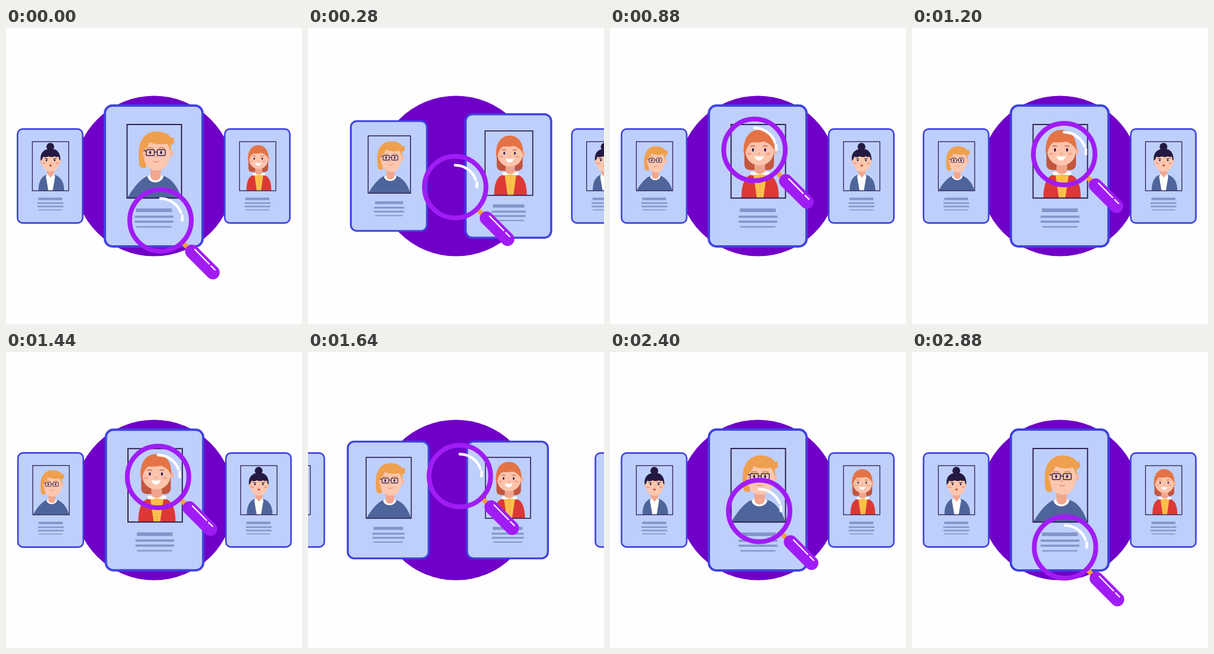
An HTML page for the animation above (2.92 s loop, 500x500 px).

```html
<!DOCTYPE html>
<html lang="en">
<head>
<meta charset="utf-8">
<title>Candidate search</title>
<style>
  html, body { margin: 0; width: 100%; height: 100%; overflow: hidden; background: #fefefe; }
  svg { display: block; width: 100vw; height: 100vh; }
</style>
</head>
<body>
<svg viewBox="0 0 500 500" xmlns="http://www.w3.org/2000/svg">
  <defs>
    <!-- artwork is drawn at full size around (249.5, 250) -->
    <g id="card">
      <rect x="167" y="131" width="165" height="238" rx="13" fill="#becffb" stroke="#4042e0" stroke-width="4"/>
      <g fill="#8495c9">
        <rect x="219.5" y="304.8" width="60.5" height="6.2"/>
        <rect x="217.3" y="316.8" width="65.4" height="3.8"/>
        <rect x="217.3" y="325.4" width="65.4" height="3.6"/>
        <rect x="220" y="334.7" width="59.4" height="2.4"/>
      </g>
    </g>
    <rect id="frame" x="204.5" y="163" width="92" height="124.3" fill="none" stroke="#2a1b4c" stroke-width="1.9"/>

    <g id="man">
      <path d="M205 287C215 270 228 253 242 249H263C278 252 290 267 296 287Z" fill="#4e659b"/>
      <path d="M239 250.5C241 264 263 264 266 250.500L261 248H244Z" fill="#fff"/>
      <path d="M244 234H261.500V250C260 260 245 260 244 250Z" fill="#f2a78f"/>
      <path d="M226 234C223 216 224 202 227 194C233 178 247 172 264 176Q274 178 279 186L283 184L284 194Q281 197 278 198L279 208L272 214L238 214L236 236Q230 238 226 234Z" fill="#efa04e"/>
      <ellipse cx="278.500" cy="212" rx="4" ry="5" fill="#f8b99f"/>
      <path d="M235 204Q241 200 242 193Q258 199 271 195Q276 199 277 208C278 226 270 241 255 241C240 241 233 228 233 216Z" fill="#fcc7ae"/>
      <ellipse cx="234" cy="213" rx="3.500" ry="5" fill="#f8b99f"/>
      <g fill="none" stroke="#d98f52" stroke-width="1.700"><path d="M238 203.500Q243 201 249 203M257 203Q263 201 268 203.500"/></g>
      <g fill="#2b1d55"><ellipse cx="243.500" cy="210.300" rx="1.700" ry="2.900"/><ellipse cx="262" cy="210.300" rx="1.700" ry="2.900"/></g>
      <g fill="none" stroke="#2b1d55" stroke-width="1.400">
        <rect x="237" y="205.500" width="13.500" height="10" rx="1.500"/>
        <rect x="255.500" y="205.500" width="13.500" height="10" rx="1.500"/>
        <path d="M250.500 209.500H255.500M237 208L233 207"/>
      </g>
      <path d="M251 217.500Q253 219 255 217.500M248 224.500Q253 228 259 224.500" fill="none" stroke="#e08f78" stroke-width="1.300"/>
    </g>

    <g id="red">
      <path d="M227 198H277V231Q276 240 266 240H238Q227 240 227 230Z" fill="#c3563f"/>
      <path d="M222 287C222 268 226 252 238 248H268C281 252 285 268 285 287Z" fill="#dc3936"/>
      <path d="M242 246H265L259 287H248Z" fill="#fcc04c"/>
      <path d="M253.500 250V286" stroke="#d88b33" stroke-width="1.200" stroke-dasharray="1.500 4"/>
      <path d="M237 243.500L245 242H262L270 243.500L268 249L254 247L239 249Z" fill="#fff"/>
      <path d="M244 228H262V243Q253 250 244 243Z" fill="#f1a58d"/>
      <ellipse cx="279" cy="208" rx="3" ry="4.500" fill="#f8b39a"/>
      <path d="M228 204C228 190 238 183 253 183C268 183 277 192 277 206C277 222 266 232 253 232C239 232 228 222 228 204Z" fill="#fcc4ac"/>
      <path d="M226 212C224 187 235 172 252 172C269 172 279 186 278 208Q273 196 261 192Q246 194 239 193Q231 199 229 211Z" fill="#e47446"/>
      <g fill="#f6a58e"><ellipse cx="235" cy="212.500" rx="4" ry="2"/><ellipse cx="267" cy="212.500" rx="4" ry="2"/></g>
      <g fill="#2b1d55"><ellipse cx="241.500" cy="206" rx="1.700" ry="2.900"/><ellipse cx="262" cy="206" rx="1.700" ry="2.900"/></g>
      <path d="M237 200Q241 198 245 200M258 200Q262 198 266 200" fill="none" stroke="#c3563f" stroke-width="1.300"/>
      <path d="M250 211.500Q252 213 254 211.500" fill="none" stroke="#e58f78" stroke-width="1.300"/>
      <path d="M244 216.500Q252 218 260 216.500Q257 224 252 224Q246 224 244 216.500Z" fill="#fff"/>
    </g>

    <g id="dark">
      <path d="M220 287C220 267 226 252 240 247H261C278 252 285 267 285 287Z" fill="#4e659b"/>
      <path d="M241 246H260L262 252L256 287H245L239 252Z" fill="#fff"/>
      <path d="M241.500 232H259.500V244L251 254L241.500 244Z" fill="#f2a78f"/>
      <circle cx="250" cy="176" r="9.800" fill="#241943"/>
      <path d="M226 213C222 190 236 181 251 181C268 181 277 192 275 213Z" fill="#241943"/>
      <g fill="#f8b99f"><ellipse cx="228.500" cy="214" rx="3" ry="5"/><ellipse cx="273" cy="214" rx="3" ry="5"/></g>
      <path d="M229 208L232 201Q239 204 245 200Q255 204 261 200Q266 203 271 201L273 210C274 228 264 239 251 239C237 239 228 228 229 208Z" fill="#fcc7ae"/>
      <g fill="#f59c8a"><ellipse cx="234" cy="217.500" rx="4" ry="2.500"/><ellipse cx="267" cy="217.500" rx="4" ry="2.500"/></g>
      <g fill="#241943"><ellipse cx="240.500" cy="210" rx="1.800" ry="2.900"/><ellipse cx="261" cy="210" rx="1.800" ry="2.900"/></g>
      <path d="M235.500 205.500L244 206.500M257 206.500L266 205.500" stroke="#241943" stroke-width="1.400"/>
      <path d="M249 216.500Q251 218 253 216.500" fill="none" stroke="#e58f78" stroke-width="1.200"/>
      <ellipse cx="250.500" cy="223.500" rx="3.200" ry="2.200" fill="#c2433f"/>
    </g>
  </defs>

  <circle cx="250" cy="250" r="135.500" fill="#7000c8"/>
  <g id="cards"></g>

  <g id="lens" fill="none" stroke-linecap="round">
    <path d="M37 37L47 47" stroke="#f2a23c" stroke-width="8" stroke-linecap="butt"/>
    <path d="M53 52.500L88.500 88" stroke="#a01cf5" stroke-width="23"/>
    <circle r="52" stroke="#a01cf5" stroke-width="8"/>
    <g stroke="#fff">
      <path d="M0 -37A37 37 0 0 1 34.500 -13" stroke-width="4.600"/>
      <path d="M36.700 -8V0" stroke-width="4.600"/>
      <path d="M58 49L82 73.500M85.500 77L92 83.500" stroke-width="2.300"/>
    </g>
  </g>
</svg>
<script>
  const LOOP = 2920, STEP = 40, SWAP = 600, BACK = 1420;
  const MID = 249.5, SIDE = 0.667;

  // Offsets from the middle and scales for a move to the right: [ms, x, scale]
  const MOVES = {
    coming: [[0, -175, SIDE], [220, -114, 0.828], [500, -2, 1.014], [600, 0, 1]],
    going: [[0, 0, 1], [220, 87.5, 0.828], [500, 185.5, 0.64], [600, 175, SIDE]],
    leaving: [[0, 175, SIDE], [220, 291, SIDE], [500, 400, SIDE], [600, 400, SIDE]],
    entering: [[0, -340, SIDE], [220, -277, SIDE], [500, -163.5, SIDE], [600, -175, SIDE]]
  };

  // Centre of the glass: [ms, x, y]
  const GLASS = [
    [0, 261, 325], [600, 233.5, 200], [1200, 257, 213], [1640, 256.5, 209.5],
    [1920, 242.5, 228.5], [2400, 252, 268.5], [2800, 256, 318], [2880, 258.5, 330], [2920, 261, 325]
  ];

  const slope = (a, b, c) => (b[c] - a[c]) / (b[0] - a[0]);

  function tangent(keys, i, c) {
    if (i === 0 || i === keys.length - 1) return 0;
    const l = slope(keys[i - 1], keys[i], c), r = slope(keys[i], keys[i + 1], c);
    return l * r <= 0 ? 0 : 2 * l * r / (l + r);
  }

  // Smooth curve through the keys that never overshoots them
  function curve(keys, t, c) {
    let i = 0;
    while (i < keys.length - 2 && t >= keys[i + 1][0]) i++;
    const a = keys[i], b = keys[i + 1], h = b[0] - a[0];
    const u = Math.min(1, (t - a[0]) / h), v = 1 - u;
    return a[c] * (1 + 2 * u) * v * v + b[c] * (3 - 2 * u) * u * u
      + h * u * v * (tangent(keys, i, c) * v - tangent(keys, i + 1, c) * u);
  }

  const SVG = "http://www.w3.org/2000/svg";
  function makeCard(person) {
    const g = document.createElementNS(SVG, "g");
    for (const id of ["card", person, "frame"]) {
      const use = document.createElementNS(SVG, "use");
      use.setAttribute("href", "#" + id);
      g.append(use);
    }
    document.getElementById("cards").append(g);
    return g;
  }

  const darkOut = makeCard("dark"), darkIn = makeCard("dark");
  const red = makeCard("red"), man = makeCard("man");
  const lens = document.getElementById("lens");

  function place(card, move, u, dir) {
    const x = MID + dir * curve(MOVES[move], u, 1), s = curve(MOVES[move], u, 2);
    card.setAttribute("transform", `translate(${x} 250) scale(${s}) translate(${-MID} -250)`);
  }

  function draw(t) {
    const back = t >= BACK, dir = back ? 1 : -1;
    const u = Math.min(back ? t - BACK : t, SWAP);
    place(back ? man : red, "coming", u, dir);
    place(back ? red : man, "going", u, dir);
    place(darkOut, "leaving", u, dir);
    place(darkIn, "entering", u, dir);
    lens.setAttribute("transform", `translate(${curve(GLASS, t, 1)} ${curve(GLASS, t, 2)})`);
  }

  const start = performance.now();
  function tick() {
    const t = (performance.now() - start) % LOOP;
    draw(Math.floor(t / STEP) * STEP);
    requestAnimationFrame(tick);
  }
  tick();
</script>
</body>
</html>
```
